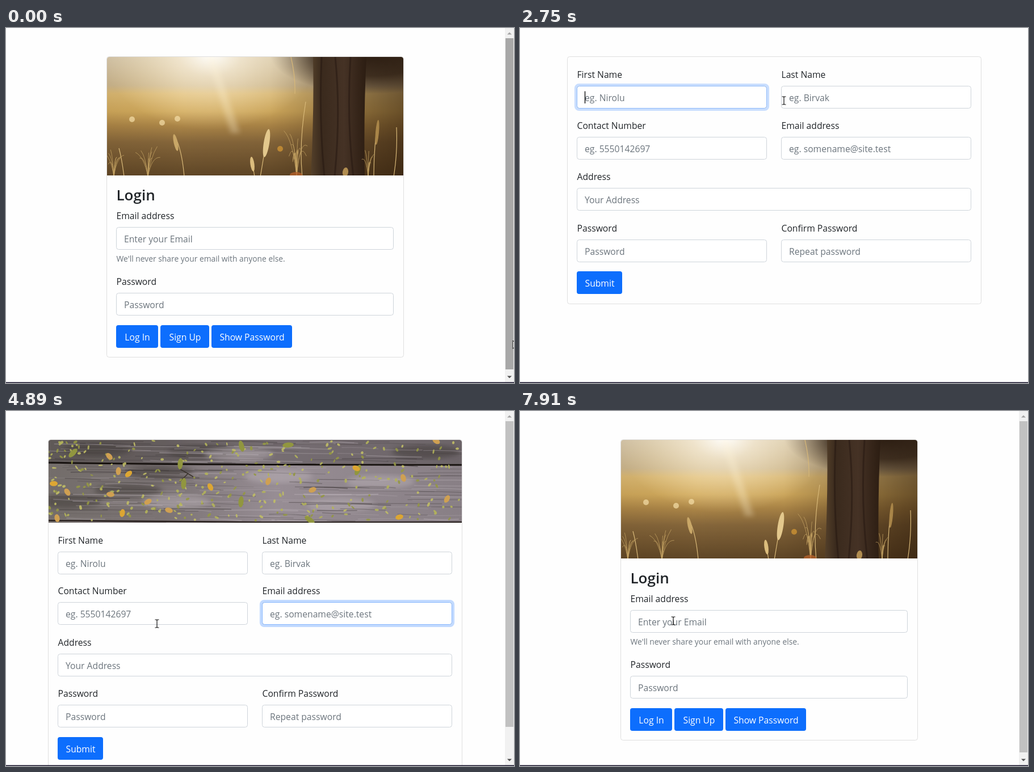
Write an HTML page that moves like this. It is 895 px wide and 626 px high and loops after 8 s.

```html
<!DOCTYPE html>
<html lang="en">
<head>
<meta charset="utf-8">
<title>Login and sign up</title>
<style>
  html, body { margin: 0; width: 100%; height: 100%; overflow: hidden; background: #fefefe; }
  svg { display: block; }
  text { font: 15.7px "Open Sans", "Noto Sans", sans-serif; fill: #212529; }
  .muted { fill: #6c757d; }
  .hint { font-size: 13.85px; fill: #6c757d; }
  .title { font-size: 26px; font-weight: 600; }
  .caption { fill: #fff; text-anchor: middle; }
  .status { font-size: 11.8px; fill: #bdc1c6; }
  .card { fill: none; stroke: #dfdfdf; }
  .field { fill: #fff; stroke: #ced4da; }
  .button { fill: #0d6efd; }
  .button.hover { fill: #0b5ed7; }
</style>
</head>
<body>
<svg id="stage" width="895" height="626" viewBox="0 0 895 626">
  <defs>
    <linearGradient id="meadow" x2="0" y2="1">
      <stop offset="0" stop-color="#d9cbb0"/><stop offset=".24" stop-color="#cdb890"/>
      <stop offset=".31" stop-color="#dcba74"/><stop offset=".46" stop-color="#d0a95c"/>
      <stop offset=".58" stop-color="#ab8547"/><stop offset=".72" stop-color="#84653a"/>
      <stop offset="1" stop-color="#5f4626"/>
    </linearGradient>
    <linearGradient id="shade">
      <stop offset="0" stop-color="#4a3010" stop-opacity=".08"/><stop offset=".25" stop-color="#2a1808" stop-opacity="0"/>
      <stop offset=".55" stop-color="#2a1808" stop-opacity=".04"/><stop offset="1" stop-color="#2a1808" stop-opacity=".62"/>
    </linearGradient>
    <radialGradient id="dusk">
      <stop offset="0" stop-color="#27180d" stop-opacity=".95"/><stop offset=".55" stop-color="#27180d" stop-opacity=".75"/>
      <stop offset="1" stop-color="#27180d" stop-opacity="0"/>
    </radialGradient>
    <radialGradient id="sun">
      <stop offset="0" stop-color="#fff"/><stop offset=".3" stop-color="#fff5e0" stop-opacity=".6"/>
      <stop offset="1" stop-color="#fbe6b4" stop-opacity="0"/>
    </radialGradient>
    <linearGradient id="bark">
      <stop offset="0" stop-color="#54402a"/><stop offset=".2" stop-color="#3a2a1d"/>
      <stop offset=".6" stop-color="#453225"/><stop offset="1" stop-color="#2c1d12"/>
    </linearGradient>
    <linearGradient id="plank">
      <stop offset="0" stop-color="#736d6a"/><stop offset=".28" stop-color="#7b7374"/>
      <stop offset=".55" stop-color="#978d94"/><stop offset="1" stop-color="#887f85"/>
    </linearGradient>
    <filter id="soft"><feGaussianBlur stdDeviation="4"/></filter>
    <clipPath id="meadowClip"><path d="M178 260V55q0-4 4-4H696q4 0 4 4V260Z"/></clipPath>
    <clipPath id="woodClip"><path d="M74.500 197V55q0-4 4-4H799q4 0 4 4V197Z"/></clipPath>
  </defs>
</svg>
<script>
const LOOP = 8000;
const stage = document.getElementById('stage');

function random(seed) {
  return () => (seed = (seed * 16807) % 2147483647) / 2147483647;
}
function add(markup) {
  const group = document.createElementNS('http://www.w3.org/2000/svg', 'g');
  group.innerHTML = markup;
  return stage.appendChild(group);
}
const clamp = v => Math.max(0, Math.min(1, v));
const repeat = (n, make) => Array.from({ length: n }, (_, i) => make(i)).join('');
const show = (el, visible) => { el.style.display = visible ? '' : 'none'; };
const text = (x, y, value, cls = '') => `<text x="${x}" y="${y}" class="${cls}">${value}</text>`;
const box = (x, y, w, h, cls) =>
  `<rect x="${x + .5}" y="${y + .5}" width="${w - 1}" height="${h - 1}" rx="4" class="${cls}"/>`;
const ellipse = (x, y, rx, ry, turn, fill, more = '') =>
  `<ellipse rx="${rx}" ry="${ry}" fill="${fill}" transform="translate(${x} ${y}) rotate(${turn})" ${more}/>`;

function meadow() {
  const rnd = random(71);
  const area = 'x="178" y="51" width="522" height="209"';
  const tuft = (x, y, n, w, h) => repeat(n, () => {
    const dx = (rnd() - .5) * w, dy = rnd() * h;
    return `M${x} 262Q${x + dx * .3} ${y + 12} ${x + dx} ${y + dy - 8}`;
  });
  const stalks = 'M448 262Q455 225 459 190M314 262Q310 215 298 192M502 51Q510 85 509 116M438 262L433 232' +
    'M648 262Q648 210 655 165M683 262Q690 220 688 175M522 262Q516 205 528 130M208 262Q204 230 199 212';
  return `<g clip-path="url(#meadowClip)">
    <rect ${area} fill="url(#meadow)"/>
    <rect ${area} fill="url(#shade)"/>
    <ellipse cx="645" cy="46" rx="180" ry="70" fill="url(#dusk)"/>
    <ellipse cx="360" cy="45" rx="190" ry="135" fill="url(#sun)"/>
    <path d="M352 45h14l46 140h-16Z" fill="#fff4d8" opacity=".28" filter="url(#soft)"/>
    ${[[222, 161], [275, 167], [302, 160], [483, 213]].map(([x, y]) =>
      ellipse(x, y, 5, 5, 0, y > 200 ? '#d99b34' : '#f6dfa8', 'opacity=".7"')).join('')}
    <path d="M541 51H635Q630 150 632 262H537Q543 150 541 51Z" fill="url(#bark)"/>
    <path d="M556 51Q551 160 561 262M580 51Q590 150 579 262M607 51Q600 160 612 262" fill="none" stroke="#241710" opacity=".5" stroke-width="3"/>
    <path d="${stalks}" fill="none" stroke="#d8b878" stroke-width="1.2"/>
    <path d="${tuft(190, 215, 9, 36, 38)}${tuft(250, 215, 10, 52, 30)}${tuft(512, 185, 14, 50, 60)}${tuft(638, 215, 7, 26, 36)}"
      fill="none" stroke="#c9a765" opacity=".7"/>
    ${ellipse(459, 203, 5, 25, 9, '#e3c88d')}${ellipse(299, 202, 3.5, 15, -12, '#c9a767')}
    ${ellipse(434, 240, 3.5, 13, -8, '#dcbd7d')}${ellipse(654, 184, 3, 22, 5, '#a98548')}
    ${ellipse(598, 254, 5, 8, 8, '#b18d50')}${ellipse(511, 259, 11, 5, 0, '#b4602a', 'opacity=".8"')}
  </g>`;
}

function planks() {
  const rnd = random(2024);
  const orange = [[84, 128], [182, 80], [198, 106], [216, 111], [184, 147], [108, 143], [205, 180], [250, 160], [287, 175],
    [360, 134], [462, 124], [540, 139], [617, 101], [700, 118], [777, 155], [693, 187], [758, 53], [90, 189]];
  const olive = [[307, 93], [313, 128], [414, 160], [118, 74], [497, 60], [535, 192], [415, 62], [620, 104]];
  const stains = [[160, 68], [215, 140], [110, 160], [270, 108], [740, 72], [345, 72]];
  const highlights = [[480, 115], [590, 165], [410, 76], [660, 125], [300, 160]];
  const patch = (fill, opacity) => ([x, y]) =>
    ellipse(x, y, 60, 12, 0, fill, `opacity="${opacity}" filter="url(#soft)"`);
  return `<g clip-path="url(#woodClip)">
    <rect x="74" y="51" width="730" height="147" fill="url(#plank)"/>
    <rect x="74" y="51" width="730" height="42" fill="#3c3735" opacity=".36"/>
    ${stains.map(patch('#3d3736', .5)).join('')}
    ${highlights.map(patch('#b9b0b6', .5)).join('')}
    ${repeat(190, () => {
      const x = 50 + rnd() * 700, y = 53 + rnd() * 143, w = 40 + rnd() * 130;
      return `<path d="M${x} ${y}q${w / 2} ${rnd() * 5 - 2.5} ${w} ${rnd() * 3}" fill="none"
        stroke="${rnd() < .55 ? '#3b3536' : '#bdb4ba'}" opacity="${.2 + rnd() * .25}" stroke-width="${.6 + rnd() * 1.5}"/>`;
    })}
    <path d="M74 91Q300 95 803 95" fill="none" stroke="#17120f" stroke-width="3"/>
    <path d="M74 193L440 196H803" fill="none" stroke="#2a2220" stroke-width="2.500"/>
    <path d="M306 102l24 14m-10 -5l-14 14" fill="none" stroke="#3a332c" stroke-width="1.500"/>
    ${repeat(300, () => ellipse(74 + 729 * rnd() ** 1.25, 52 + rnd() * 142, 1.8 + rnd() * 2.2, 1.2 + rnd() * 1.1,
      rnd() * 180, ['#b3b35a', '#c0bd66', '#949744'][Math.floor(rnd() * 3)], 'opacity=".9"'))}
    ${olive.map(([x, y], i) => ellipse(x, y, 10, 4.5, i < 2 ? 95 : 15 + i * 40, '#91963f')).join('')}
    ${orange.map(([x, y], i) => ellipse(x, y, 7, 4.5, i * 47, i % 3 ? '#cfa052' : '#dca633')).join('')}
  </g>`;
}

// A page collects its markup together with the areas that react to the pointer.
function newPage(markup) {
  const page = { markup, fields: [], buttons: [], thumb: 0 };
  page.field = (x, y, w, label, placeholder) => {
    page.fields.push({ x, y, w, h: 40 });
    page.markup += text(x + .5, y - 14, label) + box(x, y, w, 40, 'field') + text(x + 14, y + 27, placeholder, 'muted');
  };
  page.button = (x, y, w, caption) => {
    page.buttons.push({ x, y, w, h: 40 });
    page.markup += `<rect x="${x}" y="${y}" width="${w}" height="40" rx="4" class="button"/>` +
      text(x + w / 2 + .5, y + 27, caption, 'caption');
  };
  page.build = () => {
    page.group = add(page.markup);
    page.group.querySelectorAll('.button').forEach((el, i) => { page.buttons[i].el = el; });
    return page;
  };
  return page;
}

function loginPage() {
  const page = newPage(meadow() + box(177, 50, 524, 531, 'card') + text(194.5, 304, 'Login', 'title'));
  page.thumb = 584;
  page.field(194, 351, 489, 'Email address', 'Enter your Email');
  page.field(194, 467, 489, 'Password', 'Password');
  page.markup += text(194.5, 412, "We'll never share your email with anyone else.", 'hint');
  page.button(194, 524, 74, 'Log In');
  page.button(272, 524, 86, 'Sign Up');
  page.button(362, 524, 142, 'Show Password');
  return page.build();
}

function signupPage(picture) {
  const dx = picture ? -9 : 0, dy = picture ? 145.5 : 0;
  const page = newPage((picture ? planks() : '') + box(83 + dx, 50, 730, picture ? 620 : 437, 'card'));
  page.thumb = picture ? 539 : 0;
  const left = 100 + dx, right = 460 + dx;
  const [row1, row2, row3, row4, row5] = [102.2, 191.8, 282.4, 372.7, 429.3].map(y => Math.round(y + dy));
  page.field(left, row1, 335, 'First Name', 'eg. Nirolu');
  page.field(right, row1, 335, 'Last Name', 'eg. Birvak');
  page.field(left, row2, 335, 'Contact Number', 'eg. 5550142697');
  page.field(right, row2, 335, 'Email address', 'eg. somename@site.test');
  page.field(left, row3, 695, 'Address', 'Your Address');
  page.field(left, row4, 335, 'Password', 'Password');
  page.field(right, row4, 335, 'Confirm Password', 'Repeat password');
  page.button(left, row5, 80, 'Submit');
  return page.build();
}

const login = loginPage(), signup = signupPage(false), signupLoaded = signupPage(true);

function pageAt(t) {
  if (t < 1440 || t >= 7130) return login;
  return t < 2830 ? signup : signupLoaded;
}

const focuses = [
  { index: 0, from: 2620, to: 3040 },
  { index: 1, from: 3890, to: 4370 },
  { index: 3, from: 4370, to: 7130 }
];
for (const focus of focuses) {
  focus.group = add(`<g><rect x="-2" y="-2" width="339" height="44" rx="6" fill="none" stroke="#0d6efd" stroke-opacity=".25" stroke-width="4.200"/>
    <rect x=".5" y=".5" width="334" height="39" rx="4" fill="none" stroke="#86b7fe"/></g>
    <path d="M14.500 9.500V31" stroke="#000" stroke-width="1.300"/>`);
  [focus.ring, focus.caret] = focus.group.children;
}

const scrollbar = add(`<rect x="879" width="16" height="626" fill="#f1f1f1"/>
  <path d="M883 11.500h8l-4 -4Z" fill="#a3a3a3"/><path d="M883 613.500h8l-4 4Z" fill="#505050"/>
  <rect x="880" y="18" width="14" class="thumb"/>`);
const thumb = scrollbar.querySelector('.thumb');
add('<rect y="624.500" width="895" height="1.500" fill="#17132a"/>');
const status = add(`<path d="M0 602.500H130q4 0 4 4V626H0Z" fill="#35363a"/>${text(4, 618.5, 'devserver:3000/enroll', 'status')}`);

const cursors = {
  arrow: add('<path d="M0 0V14.500L3.400 11.400 5.700 16.500 8 15.500 5.800 10.700H10.400Z" fill="#fff" stroke="#000" stroke-width=".9"/>'),
  beam: add('<path d="M-3.500 -7H-1L0 -6 1 -7H3.500M0 -6V6M-3.500 7H-1L0 6 1 7H3.500" fill="none" stroke="#111" stroke-width="1.200"/>'),
  hand: add(`<path d="M-1 1.200Q.5 -.8 2 1.200V7Q3.300 6 4.500 7.300 5.800 6.600 6.800 8 8.900 7.400 9 9.500V13Q8.900 15.600 7.300 18.500H.8
    Q-.5 15.500 -3.800 11.500 -4.500 9.500 -2.200 10L-1 11.200Z" fill="#fff" stroke="#000"/>`)
};

// start, end, x, y and an optional control point that bends the way there
const moves = [
  [110, 190, 885, 574], [400, 490, 829, 574], [660, 1040, 312, 538],
  [1650, 2410, 465, 128, 580, 400], [2790, 3080, 628, 127], [3460, 3600, 590, 268],
  [3950, 4240, 597, 366], [4440, 4680, 268, 397], [4750, 4890, 266, 375],
  [5090, 5240, 217, 582], [5570, 6050, 44, 7, 100, 420],
  [7460, 7460, 137, 89], [7460, 7760, 272, 390], [7800, 7910, 270, 370]
];

function pointerAt(t) {
  let x = 893, y = 551;
  for (const [from, to, endX, endY, bendX = (x + endX) / 2, bendY = (y + endY) / 2] of moves) {
    if (t < from) break;
    const p = clamp((t - from) / (to - from || 1));
    const s = to === from ? 1 : p * p * (3 - 2 * p);
    const curve = (a, b, c) => (1 - s) ** 2 * a + 2 * s * (1 - s) * b + s * s * c;
    x = curve(x, bendX, endX);
    y = curve(y, bendY, endY);
  }
  return { x, y, visible: t < 6070 || t >= 7460 };
}

function draw(t) {
  const page = pageAt(t), pointer = pointerAt(t);
  const over = r => pointer.visible && pointer.x >= r.x && pointer.x <= r.x + r.w && pointer.y >= r.y && pointer.y <= r.y + r.h;

  for (const p of [login, signup, signupLoaded]) show(p.group, p === page);
  for (const button of page.buttons) button.el.classList.toggle('hover', over(button));

  for (const { index, from, to, group, ring, caret } of focuses) {
    const strength = clamp(Math.min((t - from) / 150, (to + 150 - t) / 150));
    show(group, page !== login && strength > 0);
    if (page === login) continue;
    const { x, y } = page.fields[index];
    group.setAttribute('transform', `translate(${x} ${y})`);
    ring.setAttribute('opacity', strength);
    show(caret, t < to && Math.floor((t - from) / 520) % 2 === 0);
  }

  show(scrollbar, page.thumb > 0);
  thumb.setAttribute('height', page.thumb);
  thumb.setAttribute('fill', pointer.visible && pointer.x >= 879 ? '#a8a8a8' : '#c1c1c1');
  show(status, t >= 1440 && t < 1750);

  const kind = page.buttons.some(over) ? 'hand' : page.fields.some(over) ? 'beam' : 'arrow';
  for (const name in cursors) {
    show(cursors[name], pointer.visible && name === kind);
    cursors[name].setAttribute('transform', `translate(${pointer.x} ${pointer.y})`);
  }
}

const start = performance.now();
function tick() {
  draw((performance.now() - start) % LOOP);
  requestAnimationFrame(tick);
}
tick();
</script>
</body>
</html>
```
